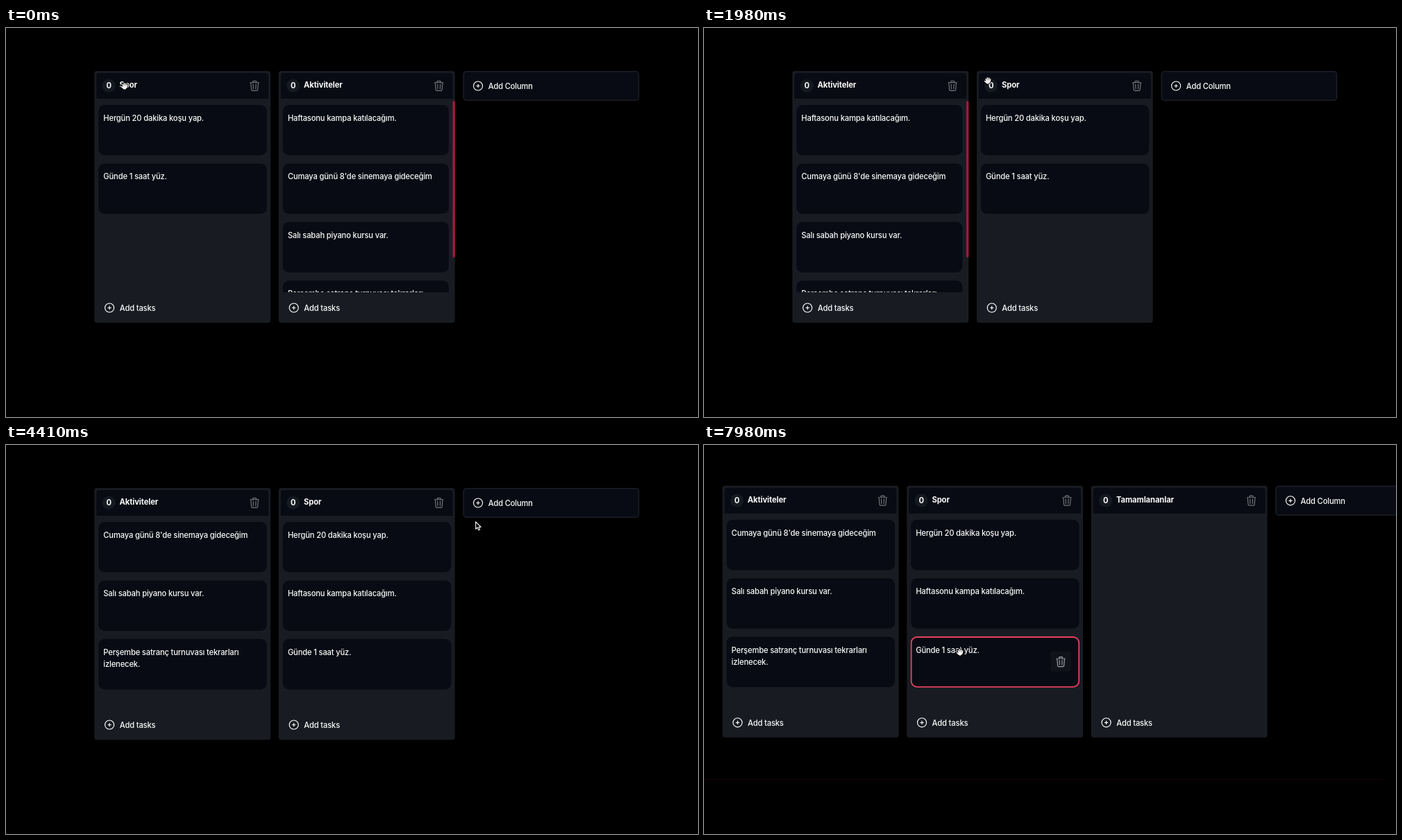
An HTML page with a canvas for the animation above (8 s loop, 997 px wide and 561 px high).

```html
<!DOCTYPE html>
<html lang="tr">
<head>
<meta charset="utf-8">
<title>Kanban</title>
<style>
html, body { margin: 0; width: 100%; height: 100%; overflow: hidden; background: #000; }
canvas { display: block; }
</style>
</head>
<body>
<canvas id="stage" width="997" height="561"></canvas>
<script>
const ctx = document.getElementById('stage').getContext('2d');
const LOOP = 8000, STEP = 265.6, COL_W = 253.8, COL_H = 363, CARD_H = 72.6, CARD_STEP = 84.4;
const PANEL = '#181c22', DARK = '#080b13', ROSE = '#e2425f', BAR = '#a3173f';

const RUN = 'Hergün 20 dakika koşu yap.', SWIM = 'Günde 1 saat yüz.';
const CAMP = 'Haftasonu kampa katılacağım.', FILM = "Cumaya günü 8'de sinemaya gideceğim";
const PIANO = 'Salı sabah piyano kursu var.', CHESS = 'Perşembe satranç turnuvası tekrarları\nizlenecek.';
const NEW_TITLE = 'Tamamlananlar';

// Moments of the story, in ms
const COL_GRAB = 100, COL_SWAP = 892, COL_DROP = 1060;
const CARD_GRAB = 2430, CARD_MOVE = 3260, CARD_DROP = 3600;
const ADD = 4950, LINE = 5500, EDIT = 6180, TYPE = 7100, ENTER = 7650;

// Pointer path: time, x, y
const path = [
  [0, 171, 84], [100, 209, 76], [510, 339, 83], [840, 339, 83], [990, 393, 79], [1060, 539, 80],
  [1380, 539, 80], [1960, 409, 76], [2190, 409, 76], [2400, 290, 156], [2430, 290, 156],
  [2790, 546, 381], [2970, 500, 340], [3030, 500, 340], [3150, 386, 181], [3380, 540, 222],
  [3600, 560, 245], [3840, 560, 245], [4410, 680, 117], [4620, 705, 86], [5000, 705, 86],
  [5430, 720, 92], [6150, 656, 78], [6330, 656, 78], [6420, 647, 77], [6720, 603, 77],
  [7600, 603, 77], [7980, 369, 299], [8000, 369, 299]
];

const clamp = v => Math.max(0, Math.min(1, v));
const ease = v => 1 - (1 - clamp(v)) ** 2.4;
const mix = (a, b, k) => a + (b - a) * k;

function slope(i, axis) {
  const a = path[i - 1], p = path[i], b = path[i + 1];
  if (!a || !b || (a[1] === p[1] && a[2] === p[2]) || (b[1] === p[1] && b[2] === p[2])) return 0;
  return (b[axis] - a[axis]) / (b[0] - a[0]);
}

function pointerAt(t) {
  let i = 0;
  while (i < path.length - 2 && path[i + 1][0] <= t) i++;
  const a = path[i], b = path[i + 1], d = b[0] - a[0], u = (t - a[0]) / d;
  const [x, y] = [1, 2].map(n =>
    a[n] + (b[n] - a[n]) * u * u * (3 - 2 * u) +
    d * (slope(i, n) * u * (1 - u) ** 2 - slope(i + 1, n) * u * u * (1 - u)));
  return { x, y };
}

function box(x, y, w, h, r, fill, stroke, line = 1.5) {
  ctx.beginPath();
  ctx.roundRect(x, y, w, h, r);
  if (fill) { ctx.fillStyle = fill; ctx.fill(); }
  if (stroke) { ctx.strokeStyle = stroke; ctx.lineWidth = line; ctx.stroke(); }
}

function text(s, x, y, bold) {
  ctx.font = (bold ? '700' : '500') + ' 11.2px Inter, "Liberation Sans", sans-serif';
  ctx.letterSpacing = bold ? '-0.08px' : '-0.16px';
  ctx.fillStyle = '#fafafa';
  ctx.fillText(s, x, y);
  return ctx.measureText(s).width;
}

const trashPath = new Path2D('M4.6 6L5.8 20Q6 21.7 8 21.7H16Q18 21.7 18.2 20L19.4 6' +
  'M3.5 6Q12 4.6 20.5 6M8.3 5.4V4.5Q8.3 2.3 10.4 2.3H13.6Q15.7 2.3 15.7 4.5V5.4M9.3 9L9.6 18M14.7 9L14.4 18');
const plusPath = new Path2D('M12 9V15M9 12H15M21 12A9 9 0 1 1 3 12A9 9 0 1 1 21 12');
const handPath = new Path2D('M-2.9 -2.5L-1.6 1M-.7 -4.2L-.3 1M1.7 -3.8L1.3 1M3.7 -2L2.7 2M-4.3 .6L-2 3M-1.4 1.8H1.8L1 3.6H-1Z');
const arrowPath = new Path2D('M-3.5 -6V4.4L-1.1 2.2L.7 6L2.5 5.2L.8 1.5H4Z');
const beamPath = new Path2D('M-2.5 -6.5Q0 -6.5 0 -5V5Q0 6.5 2.5 6.5M2.5 -6.5Q0 -6.5 0 -5M0 5Q0 6.5 -2.5 6.5M-1.5 2H1.5');

function icon(shape, x, y, color) {
  ctx.save();
  ctx.translate(x, y);
  ctx.scale(.7257, .7257);
  ctx.translate(-12, -12);
  ctx.strokeStyle = color;
  ctx.lineWidth = 1.6;
  ctx.lineCap = ctx.lineJoin = 'round';
  ctx.stroke(shape);
  ctx.restore();
}

const inside = (p, x, y, w, h) => p && p.x > x && p.x < x + w && p.y > y && p.y < y + h;

function card(label, x, y, w, hot) {
  box(x, y, w, CARD_H, 8.5, DARK);
  if (hot) {
    box(x + .4, y + .4, w - .8, CARD_H - .8, 8.2, null, ROSE, 1.8);
    box(x + w - 41, y + 21, 29, 29, 3, '#10141a');
    icon(trashPath, x + w - 26.5, y + 36, '#a0a2a6');
  }
  label.split('\n').forEach((s, i) => text(s, x + 7, y + 23 + i * 17.4));
}

const ghostCard = (x, y, w) => box(x + 1.2, y + 1.2, w - 2.4, CARD_H - 2.4, 8.5, PANEL, '#6d1f33', 2.4);

// cards: list of { label, y } with y counted from the first slot; label null is the ghost
function column(x, y, title, cards, { bar = false, scroll = 0, gap = 0, mouse = null } = {}) {
  box(x, y, COL_W, COL_H, 3.5, PANEL);
  box(x + 3, y + 3, COL_W - 6, 37, [4, 4, 0, 0], DARK);
  ctx.beginPath();
  ctx.arc(x + 20.8, y + 21.3, 9.6, 0, 7);
  ctx.fillStyle = '#151920';
  ctx.fill();
  text('0', x + 17.2, y + 25.3, true);
  if (title) text(title, x + 36.2, y + 24.4, true);
  icon(trashPath, x + 230.8, y + 21.3, '#73767b');

  ctx.save();
  ctx.beginPath();
  ctx.rect(x, y + 42, COL_W, 277);
  ctx.clip();
  const w = bar ? 239 : 242.4, cx = x + 6;
  for (const c of cards) {
    const cy = y + 49 + c.y - scroll;
    if (c.label) card(c.label, cx, cy, w, inside(mouse, cx, cy, w, CARD_H));
  }
  const ghost = cards.find(c => !c.label);
  if (ghost) {
    const gy = y + 49 + ghost.y - scroll;
    if (gap) {
      ctx.fillStyle = PANEL;
      ctx.fillRect(cx, gy + CARD_H, w, gap);
    }
    ghostCard(cx, gy, w);
    // cards further down stay above the cover
    if (gap) cards.slice(2).forEach(c => card(c.label, cx, y + 49 + c.y - scroll, w));
  }
  ctx.restore();
  if (bar) box(x + 250.6, y + 43, 3.4, 226 + scroll * .82, 1.7, BAR);

  icon(plusPath, x + 21.8, y + 341.5, '#fff');
  text('Add tasks', x + 36.4, y + 345.8);
}

function addButton(x, y, mouse) {
  const hot = inside(mouse, x, y, COL_W, 43);
  if (hot) box(x - 1.5, y - 1.5, COL_W + 3, 46, 5, null, ROSE, 2);
  box(x + .8, y + .8, COL_W - 1.6, 41.4, 4, DARK, '#1a1f26', 1.6);
  icon(plusPath, x + 21.6, y + 21.5, '#fff');
  text('Add Column', x + 36.2, y + 25.8);
}

function titleEditor(x, y, t, mouse) {
  const typed = t >= TYPE;
  const label = typed ? NEW_TITLE.slice(0, 1 + Math.floor((t - TYPE) / 38)) : 'Column 3';
  box(x + 36.4, y + 11.8, 155, 20, 2.5, '#04060a', '#c93c56', 1.4);
  const tx = x + 42, end = tx + 54;
  if (!typed && t >= 6330) {
    const from = t > 6700 ? tx : Math.max(tx, Math.min(end, mouse.x - 1));
    ctx.fillStyle = '#52667f';
    ctx.fillRect(from, y + 13.5, end - from, 17);
  }
  const w = text(label, tx, y + 25.8, true);
  if (typed || t < 6330) {
    ctx.fillStyle = '#fff';
    ctx.fillRect(tx + w + .5, y + 15, 1, 13);
  }
}

function pointer(t, { x, y }, overBoard) {
  ctx.save();
  ctx.translate(x, y);
  ctx.lineCap = ctx.lineJoin = 'round';
  const stroke = (shape, color, width) => {
    ctx.strokeStyle = color;
    ctx.lineWidth = width;
    ctx.stroke(shape);
  };
  if (t >= EDIT && t < ENTER) {
    stroke(beamPath, '#000', 2.4);
    stroke(beamPath, '#e8e8e8', 1.1);
  } else if (overBoard) {
    stroke(handPath, '#000', 3.4);
    stroke(handPath, '#fff', 1.6);
  } else {
    ctx.fillStyle = '#000';
    ctx.fill(arrowPath);
    stroke(arrowPath, '#e4e4e4', 1.2);
  }
  ctx.restore();
}

const stack = labels => labels.map((label, i) => ({ label, y: i * CARD_STEP }));

function sportCards(t) {
  if (t < CARD_MOVE) return stack([RUN, SWIM]);
  const landed = t >= CARD_DROP + 200;
  const list = stack([RUN, landed ? CAMP : null, SWIM]);
  list[2].y = CARD_STEP * (1 + ease((t - CARD_MOVE) / 200));
  return list;
}

function activityColumn(x, y, t, mouse) {
  if (t >= CARD_MOVE) return column(x, y, 'Aktiviteler', stack([FILM, PIANO, CHESS]), { mouse });
  const dragged = t >= CARD_GRAB;
  const cards = stack([dragged ? null : CAMP, FILM, PIANO, CHESS]);
  const scroll = 55 * clamp((t - 2700) / 270);
  const k = t > 3030 ? Math.sin(Math.PI * clamp((t - 3030) / 240)) : 0;
  cards[0].y += 21 * k;
  cards[1].y += 54 * k;
  column(x, y, 'Aktiviteler', cards, { bar: true, scroll, gap: 57 * k, mouse });
}

function draw(t) {
  ctx.fillStyle = '#000';
  ctx.fillRect(0, 0, 997, 561);
  const p = pointerAt(t);
  const grown = t >= ADD;
  const left = grown ? 26.6 : 127.3, top = grown ? 58.8 : 62;
  const colDrag = t >= COL_GRAB && t < COL_DROP + 170;
  const cardDrag = t >= CARD_GRAB && t < CARD_DROP + 200;
  const mouse = colDrag || cardDrag ? null : p;

  const swap = ease((t - COL_SWAP) / 200);
  const sportX = left + STEP * swap, activityX = left + STEP * (1 - swap);

  if (colDrag) box(sportX + .5, top + .5, COL_W - 1.4, COL_H - 1, 3.5, '#070b12', '#bd3852', 1.5);
  else column(sportX, top, 'Spor', sportCards(t), { mouse });
  activityColumn(activityX, top, t, mouse);

  if (grown) {
    const x = left + 2 * STEP, editing = t >= EDIT && t < ENTER;
    column(x, top, editing ? '' : t < EDIT ? 'Column 3' : NEW_TITLE, []);
    if (editing) titleEditor(x, top, t, p);
  }
  addButton(left + STEP * (grown ? 3 : 2), top, mouse);

  if (t >= LINE) {
    ctx.fillStyle = '#180206';
    ctx.fillRect(0, 482, 977, 1);
  }

  if (colDrag) {
    const k = ease((t - COL_DROP) / 170);
    column(mix(left + p.x - 209, left + STEP, k), mix(top + p.y - 76, top, k), 'Spor', stack([RUN, SWIM]));
  }
  if (cardDrag) {
    const k = ease((t - CARD_DROP) / 200);
    card(CAMP, mix(p.x - 157, left + STEP + 6, k), mix(p.y - 45, top + 49 + CARD_STEP, k), 239, true);
  }

  const boardW = STEP * (grown ? 3 : 2) - 12;
  const overBoard = cardDrag || inside(p, left, top, boardW, COL_H) || inside(p, left + boardW + 12, top, COL_W, 43);
  pointer(t, p, overBoard);
}

function tick() {
  draw(performance.now() % LOOP);
  requestAnimationFrame(tick);
}
tick();
</script>
</body>
</html>
```
